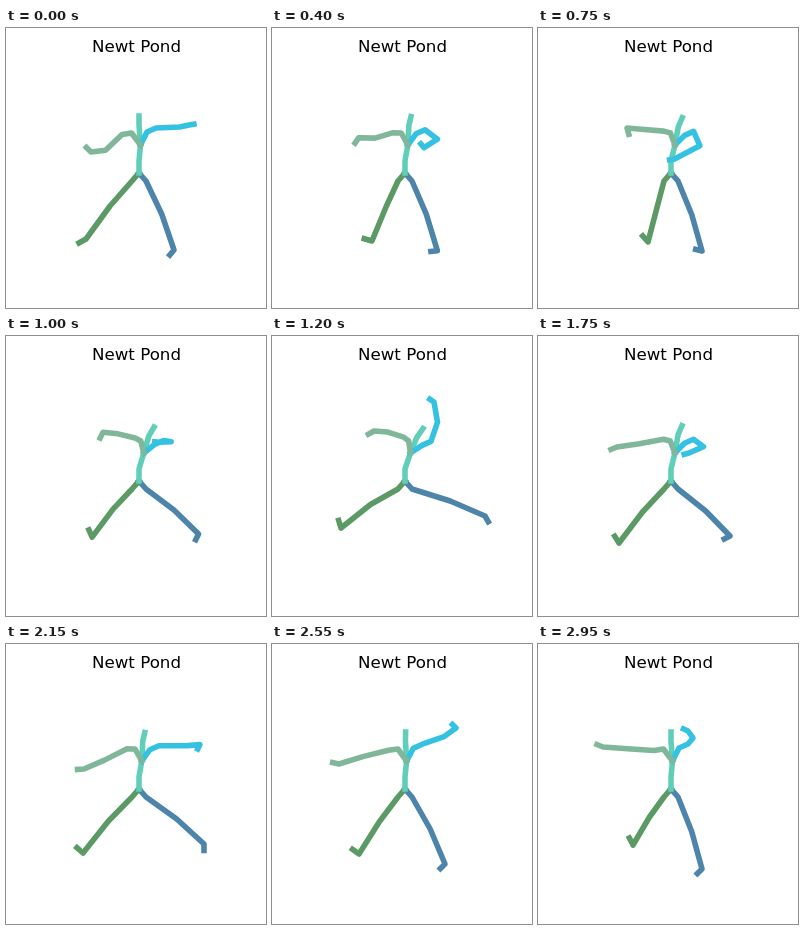
These frames come from a looping animation (260x280 px, 3 s). An HTML page:

```html
<!DOCTYPE html>
<html lang="en">
<head>
<meta charset="utf-8">
<title>Newt Pond</title>
<style>
  html, body { margin: 0; width: 100%; height: 100%; overflow: hidden; background: #fff; }
  svg { display: block; width: 260px; height: 280px; }
  path { fill: none; stroke-width: 5.56; stroke-linecap: square; stroke-linejoin: round; }
  text { font: 16.67px "DejaVu Sans", sans-serif; text-anchor: middle; }
</style>
</head>
<body>
<svg viewBox="0 0 260 280">
  <text x="130.5" y="24">Newt Pond</text>
  <path id="rightLeg" stroke="#4D84AA"/>
  <path id="leftLeg" stroke="#5B9965"/>
  <path id="spine" stroke="#61CEB9"/>
  <path id="rightArm" stroke="#34C1E2"/>
  <path id="leftArm" stroke="#80B79A"/>
</svg>
<script>
const LOOP = 3000, STEP = 50;
const HIP = [133, 145];

// Where each ankle or wrist travels: time in ms, x, y, direction of foot or hand in degrees.
const travel = {
  rightLeg: [
    [0, 168, 222, 130], [750, 164, 223, 194], [1200, 213, 180, 60], [1750, 192, 200, 153],
    [2150, 198, 200, 90], [2550, 173, 220, 135], [2950, 164, 225, 135]
  ],
  leftLeg: [
    [0, 80, 211, 151], [750, 110, 214, 229], [1200, 69, 192, 253], [1750, 81, 207, 238],
    [2150, 77, 209, 221], [2550, 87, 210, 216], [2950, 95, 201, 243]
  ],
  rightArm: [
    [0, 183, 97, 350], [750, 136.5, 131, 170], [1100, 160, 90, 194], [1200, 162, 66, 214],
    [1750, 151, 117, 165], [2150, 194, 100.5, 117], [2550, 184, 84, 225], [2950, 150, 87, 205]
  ],
  leftArm: [
    [0, 85, 124, 225], [750, 89, 100, 74], [1200, 102, 95, 150], [1750, 79, 111, 158],
    [2150, 78, 125, 176], [2550, 67, 120, 192], [2950, 65, 103, 202]
  ]
};

const offset = ([x, y], dx, dy) => [x + dx, y + dy];
const middle = (a, b) => [(a[0] + b[0]) / 2, (a[1] + b[1]) / 2];

function extend([x, y], length, degrees) {
  const a = degrees * Math.PI / 180;
  return [x + length * Math.cos(a), y + length * Math.sin(a)];
}

// Tangent that never overshoots a key value.
function tangent(track, i, c) {
  const slope = j => (track[j + 1][c] - track[j][c]) / (track[j + 1][0] - track[j][0]);
  if (i === 0) return slope(0);
  if (i === track.length - 1) return slope(i - 1);
  const a = slope(i - 1), b = slope(i);
  return a * b > 0 ? 2 * a * b / (a + b) : 0;
}

function sample(track, time) {
  let i = 0;
  while (i < track.length - 2 && time >= track[i + 1][0]) i++;
  const from = track[i], to = track[i + 1];
  const span = to[0] - from[0], s = (time - from[0]) / span;
  const ease = s * s * (3 - 2 * s);
  return [1, 2, 3].map(c => from[c] + (to[c] - from[c]) * ease
    + span * s * (1 - s) * ((1 - s) * tangent(track, i, c) - s * tangent(track, i + 1, c)));
}

function draw(id, points) {
  const d = "M" + points.map(p => p.map(v => v.toFixed(2)).join()).join("L");
  document.getElementById(id).setAttribute("d", d);
}

// bend(end, root) gives the shift of the knee or elbow from the middle of the limb.
function drawLimb(id, time, base, root, tipLength, bend) {
  const [x, y, angle] = sample(travel[id], time);
  const end = [x, y];
  const joint = offset(middle(root, end), ...bend(end, root));
  draw(id, [...base, root, joint, end, extend(end, tipLength, angle)]);
}

function render(time) {
  // The torso leans steadily to one side and back.
  const lean = 18 * Math.max(0, Math.min(time / 1200, (2600 - time) / 1400));
  const dip = 0.014 * lean * lean;
  const chest = [134.5 + 0.22 * lean, 117];
  const neck = [133 + 0.65 * lean, 97 + dip];
  const head = [133 + lean, 88 + dip];
  draw("spine", [HIP, [133, 133], chest, neck, head]);

  drawLimb("rightLeg", time, [HIP], offset(HIP, 7, 8), 6.5, () => [1.7, -1.5]);
  drawLimb("leftLeg", time, [HIP], offset(HIP, -7, 8), 8, () => [1, -4]);

  const rightCollar = offset(chest, 6.5 + 0.28 * lean, -13 + 0.3 * lean);
  const rightShoulder = offset(rightCollar, 9, -4);
  drawLimb("rightArm", time, [chest, rightCollar], rightShoulder, 5,
    ([, y]) => [Math.max(5, 8 + 0.25 * (y - 100)), 0.5]);

  // The left elbow sags more the lower and the more folded the arm is.
  const leftCollar = offset(chest, -9 + 0.4 * lean, -12);
  const leftShoulder = offset(leftCollar, -9.5 + 0.25 * lean, 1.5 - 0.3 * lean);
  drawLimb("leftArm", time, [chest, leftCollar], leftShoulder, 6.5,
    ([x, y], root) => [-1, 0.02 * (y - 100) * (50 - Math.hypot(x - root[0], y - root[1]))]);
}

function tick() {
  const time = performance.now() % LOOP;
  render(Math.floor(time / STEP) * STEP);
  requestAnimationFrame(tick);
}
tick();
</script>
</body>
</html>
```
